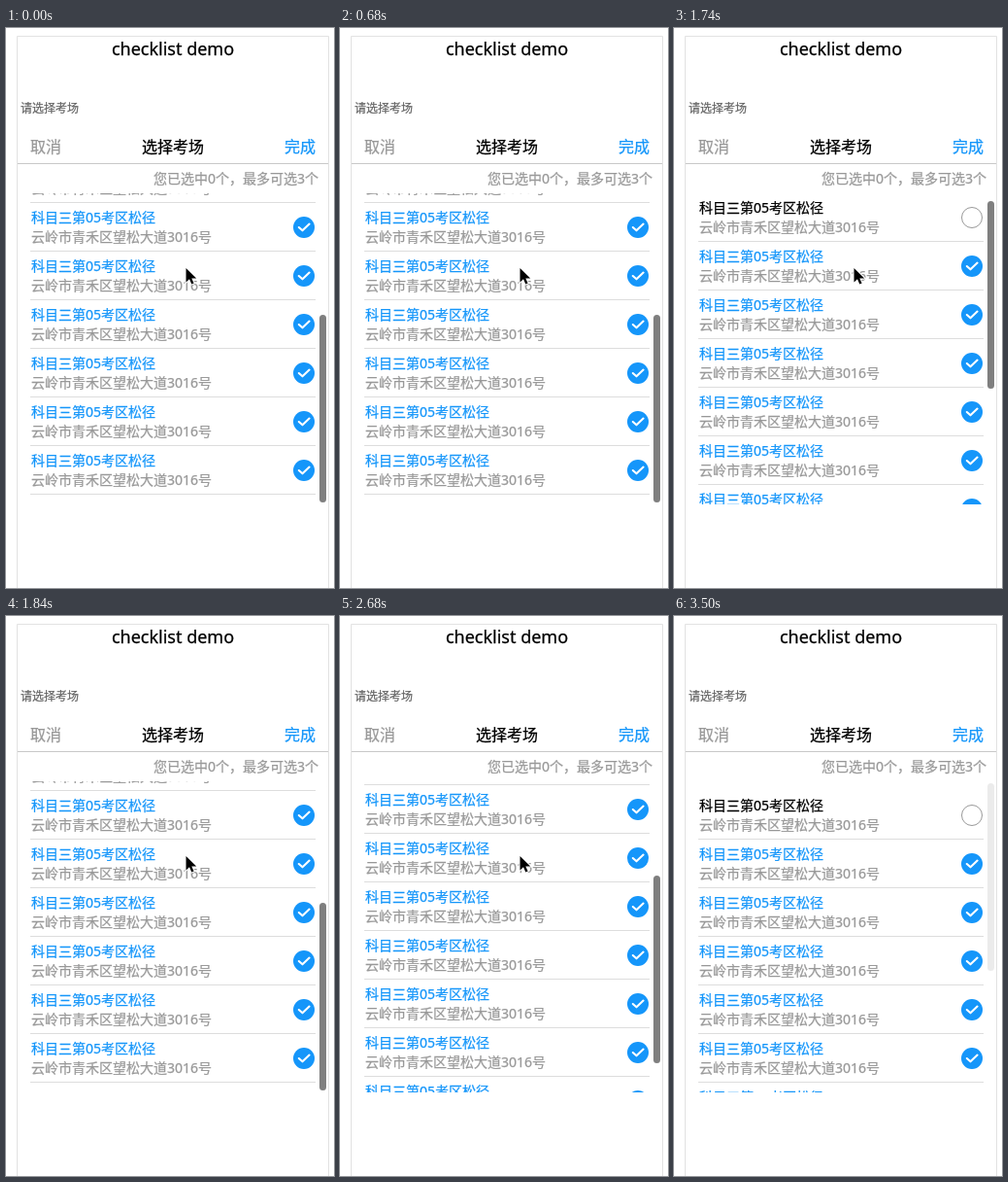
An HTML page that plays this animation: 338x576 px, repeating every 4.16 s.

```html
<!DOCTYPE html>
<html lang="zh-CN">
<head>
<meta charset="utf-8">
<title>checklist demo</title>
<style>
  html, body { margin: 0; width: 100%; height: 100%; overflow: hidden; background: #fff; }
  svg { display: block; width: 100vw; height: 100vh; }
  text {
    font: 14px "Noto Sans", "Noto Sans CJK SC", "Noto Sans CJK", sans-serif;
    color: #999; fill: currentColor; stroke: currentColor; stroke-width: .25px;
  }
  .title { font-size: 18px; color: #000; }
  .bar { font-size: 16px; }
  .label { font-size: 12px; color: #666; }
  .black { color: #000; }
  .blue { color: #1596fa; fill: currentColor; }
  .middle { text-anchor: middle; }
  .end { text-anchor: end; }
  .tick { fill: none; stroke: #fff; stroke-width: 2.1; stroke-linecap: round; stroke-linejoin: round; }
  .empty { fill: #fff; stroke: #999; }
  #cursor { stroke: #fff; stroke-width: 2; paint-order: stroke; }
</style>
</head>
<body>
<svg viewBox="0 0 338 576">
  <clipPath id="viewport"><rect x="12" y="170" width="320" height="320"/></clipPath>
  <path d="M11.5 576V8.5H332.5V576" fill="none" stroke="#e2e2e2"/>
  <text class="title middle" x="172" y="28">checklist demo</text>
  <text class="label" x="15" y="87">请选择考场</text>
  <text class="bar" x="25" y="128">取消</text>
  <text class="bar black middle" x="172" y="128">选择考场</text>
  <text class="bar blue end" x="319" y="128">完成</text>
  <path d="M12 139.5H332" stroke="#c8c8c8"/>
  <text class="end" x="322" y="160">您已选中0个，最多可选3个</text>
  <g clip-path="url(#viewport)"><g id="list"></g></g>
  <rect id="thumb" x="323" y="172" width="7" height="193" rx="3.5"/>
  <path id="cursor" d="M.5 .5V15L4 11.8 6.3 17 8.6 16 6.3 11H11.2Z"/>
</svg>
<script>
const LOOP = 4160, ROWS = 10, ROW_HEIGHT = 50, MAX_SCROLL = 200, THUMB_TRAVEL = 123;

// start, end, number of steps, scroll position reached
const flicks = [
  [210, 330, 3, 0],
  [570, 680, 3, MAX_SCROLL],
  [1000, 1170, 4, 0],
  [1740, 1840, 4, MAX_SCROLL],
  [2080, 2200, 3, 0],
  [2380, 2440, 2, MAX_SCROLL],
  [2680, 2740, 2, 0],
];

const [list, thumb, cursor] = ['list', 'thumb', 'cursor'].map(id => document.getElementById(id));

function rowMarkup(index) {
  const checked = index > 0;
  const mark = checked
    ? '<circle class="blue" cx="307" cy="25" r="11"/><path class="tick" d="M301.8 25L305.5 28.3 312.6 21.6"/>'
    : '<circle class="empty" cx="307" cy="25" r="10.5"/>';
  return `<g transform="translate(0 ${180 + index * ROW_HEIGHT})">
    <text class="${checked ? 'blue' : 'black'}" x="26" y="20">科目三第05考区松径</text>
    <text x="26" y="40">云岭市青禾区望松大道3016号</text>
    ${mark}<path d="M25 49.5H319" stroke="#ddd"/></g>`;
}
list.innerHTML = Array.from({ length: ROWS }, (_, i) => rowMarkup(i)).join('');

// Fraction done of a move whose first step shows at start and last at end.
function stepped(time, start, end, count) {
  if (time < start) return 0;
  const step = Math.floor((time - start) / (end - start) * (count - 1) + 1e-6) + 1;
  return Math.min(step, count) / count;
}

const accelerate = p => p ** 2.18;
const mix = (a, b, p) => a + (b - a) * p;

function draw(time) {
  const scroll = Math.round(flicks.reduce((position, [start, end, count, target]) =>
    mix(position, target, accelerate(stepped(time, start, end, count))), MAX_SCROLL));
  list.setAttribute('transform', `translate(0 ${-scroll})`);
  thumb.setAttribute('y', 172 + Math.floor(scroll / MAX_SCROLL * THUMB_TRAVEL));
  thumb.setAttribute('opacity', mix(0.5, 0.08, stepped(time, 3380, 3500, 4)));

  // The pointer leaves in four jumps, then vanishes.
  const away = accelerate(stepped(time, 2910, 3015, 4));
  cursor.setAttribute('transform', `translate(${mix(185, 274, away)} ${mix(246.5, 505, away)})`);
  cursor.setAttribute('visibility', time < 3050 ? 'visible' : 'hidden');
}

function tick() {
  draw(performance.now() % LOOP);
  requestAnimationFrame(tick);
}
tick();
</script>
</body>
</html>
```
